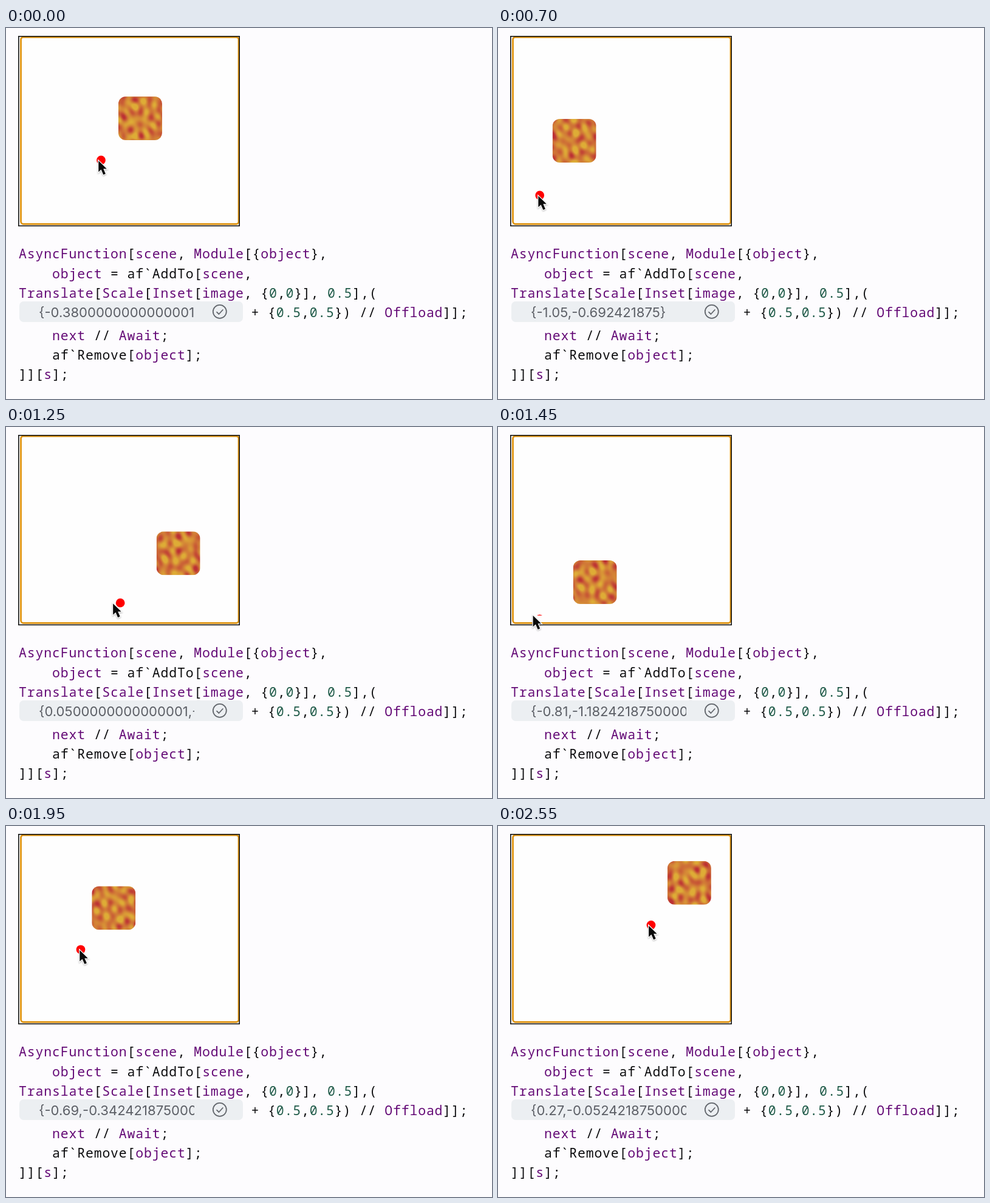
An HTML page with a canvas for the animation above (2600 ms loop, 800 by 612 pixels).

```html
<!DOCTYPE html>
<html lang="en">
<head>
<meta charset="utf-8">
<title>Draggable scene</title>
<style>
  html, body { margin: 0; width: 100%; height: 100%; overflow: hidden; background: #fdfcfe; }
  svg, canvas { position: absolute; left: 0; top: 0; }
  canvas { border-radius: 12px; }
  text { white-space: pre; }
  .code { font: 500 21.5px "Noto Sans Mono", monospace; letter-spacing: .83px; fill: #0c0c0e; }
  .name { fill: #640a76; }
  .num { fill: #1f5a48; }
  .field { font: 22.1px Inter, sans-serif; fill: #5c5f66; }
</style>
</head>
<body>
<svg width="800" height="612" viewBox="0 0 800 612">
  <defs>
    <clipPath id="plot"><rect x="25" y="16" width="357" height="295"/></clipPath>
    <clipPath id="slot"><rect x="50" y="452" width="260" height="34"/></clipPath>
  </defs>
  <rect x="20" y="13" width="365" height="314" fill="#fefefe"/>
  <rect x="24.5" y="15" width="358.5" height="308.3" rx="4" fill="none" stroke="#df930f" stroke-width="2.8"/>
  <rect x="20.8" y="13.8" width="363.4" height="312.6" fill="none" stroke="#111" stroke-width="1.6"/>
  <g clip-path="url(#plot)"><circle id="dot" r="7.4" fill="#f00"/></g>
  <g id="code" class="code"></g>
  <rect x="22" y="451" width="368" height="34" rx="7" fill="#eceff2"/>
  <g clip-path="url(#slot)"><text id="field" class="field" x="54" y="476.7"></text></g>
  <g fill="none" stroke="#62666c" stroke-width="1.8" stroke-linecap="round" stroke-linejoin="round">
    <circle cx="351.8" cy="467.8" r="11"/>
    <path d="M347 468.6l3.4 3.4 6.4-7"/>
  </g>
</svg>
<canvas id="tile" width="72" height="72"></canvas>
<svg width="800" height="612" viewBox="0 0 800 612">
  <g id="cursor" style="filter:drop-shadow(0 1px 1px rgba(0,0,0,.3))">
    <path d="M0 0V18.5L4.3 14.6 8 23 11.6 21.4 8 13.3H13.5Z" fill="#0a0a0a" stroke="#fff" stroke-width="2.4" paint-order="stroke"/>
  </g>
</svg>
<script>
const LOOP = 2600, STEP = 50, BEAT = 200, UNIT = 143.3, FLOOR = 311;
const $ = id => document.getElementById(id);

// where the dot is dragged, one point per beat, starting a beat early
const route = [
  [120, 226], [156.5, 218], [153, 202], [77.5, 200], [46, 242],
  [108, 304], [209.5, 298], [212, 280], [88, 327.6], [39, 254],
  [75, 216], [140, 200], [206, 179], [226, 170], [258, 162]
];

// Catmull-Rom curve through the route
function dotAt(t) {
  const s = t / BEAT + 1, i = Math.floor(s), u = s - i;
  const at = n => route[Math.min(Math.max(n, 0), route.length - 1)];
  const [p, a, b, q] = [at(i - 1), at(i), at(i + 1), at(i + 2)];
  return [0, 1].map(n => {
    const ma = (b[n] - p[n]) / 2, mb = (q[n] - a[n]) / 2, d = b[n] - a[n];
    return a[n] + u * (ma + u * (3 * d - 2 * ma - mb + u * (ma + mb - 2 * d)));
  });
}

const lines = [
  [21, 380, "AsyncFunction[scene, Module[{object},"],
  [76, 412.5, "object = af`AddTo[scene,"],
  [21, 445, "Translate[Scale[Inset[image, {0,0}], 0.5],("],
  [403.5, 476.5, "+ {0.5,0.5}) // Offload]];"],
  [76, 514.5, "next // Await;"],
  [76, 546.5, "af`Remove[object];"],
  [21, 578.5, "]][s];"]
];
const plain = ["af", "AddTo", "Remove"];
const paint = token =>
  /^\d/.test(token) ? `<tspan class="num">${token}</tspan>` :
  plain.includes(token) ? token : `<tspan class="name">${token}</tspan>`;
$("code").innerHTML = lines.map(([x, y, s]) =>
  `<text x="${x}" y="${y}">${s.replace(/[a-z]+|\d+(\.\d+)?/gi, paint)}</text>`).join("");

// hundredths, most with a tail of floating point rounding
function showX(k) {
  if (k % 3 === 0) return String(k / 100);
  const sign = k < 0 ? "-" : "", n = Math.abs(k);
  return n % 20 === 10
    ? sign + ((n - 1) / 100).toFixed(2) + "99999999999998"
    : sign + (n / 100).toFixed(2) + "00000000000001";
}
const showY = k => (k / 100 - .002421875).toFixed(9) + (k % 3 ? "0000001" : "");

// drifting plane waves in seeded directions make the mottled tile
let seed = 7;
const random = () => (seed = seed * 16807 % 2147483647) / 2147483647;
const waves = Array.from({ length: 9 }, (_, i) => {
  const angle = i * Math.PI / 9 + random() * .3, f = .22 + random() * .22;
  return { x: f * Math.cos(angle), y: f * Math.sin(angle), phase: random() * 6.28, speed: (random() - .5) / 60 };
});
const ctx = $("tile").getContext("2d"), pixels = ctx.createImageData(72, 72);
const ramp = [[188, 48, 52], [207, 114, 54], [222, 172, 54]];
function drawTile(t) {
  for (let y = 0, p = 0; y < 72; y++) for (let x = 0; x < 72; x++, p += 4) {
    let sum = 0;
    for (const w of waves) sum += Math.sin(w.x * x + w.y * y + w.phase + w.speed * t);
    const edge = Math.max(0, Math.abs(x - 35.5) - 24) / 12;
    const v = Math.min(1.999, Math.max(0, 1.3 + sum * .22 - edge * .5));
    const i = Math.floor(v), a = ramp[i], b = ramp[i + 1];
    for (let c = 0; c < 3; c++) pixels.data[p + c] = a[c] + (b[c] - a[c]) * (v - i);
    pixels.data[p + 3] = 255;
  }
  ctx.putImageData(pixels, 0, 0);
}

const place = (el, x, y) =>
  el.setAttribute("transform", `translate(${x.toFixed(2)} ${y.toFixed(2)})`);

function draw(t) {
  const [x, y] = dotAt(t), [px, py] = dotAt(t - STEP);
  place($("dot"), x, y);
  // the pointer runs ahead of the dot and stays above the floor
  place($("cursor"), x - 6 + (x - px) / 4, Math.min(y + 1, FLOOR));
  // the tile sits half a unit right of and above the previous dot position
  $("tile").style.transform =
    `translate(${(px + UNIT / 2 - 36).toFixed(2)}px, ${(py - UNIT / 2 - 36).toFixed(2)}px)`;
  const kx = Math.round((px - 204.2) / UNIT * 100);
  const ky = Math.round((157.8 - py) / UNIT * 100 + .242);
  $("field").textContent = `{${showX(kx)},${showY(ky)}}`;
  drawTile(t);
}

const start = performance.now();
let shown = -1;
function tick() {
  const t = Math.floor((performance.now() - start) % LOOP / STEP) * STEP;
  if (t !== shown) draw(shown = t);
  requestAnimationFrame(tick);
}
tick();
</script>
</body>
</html>
```
